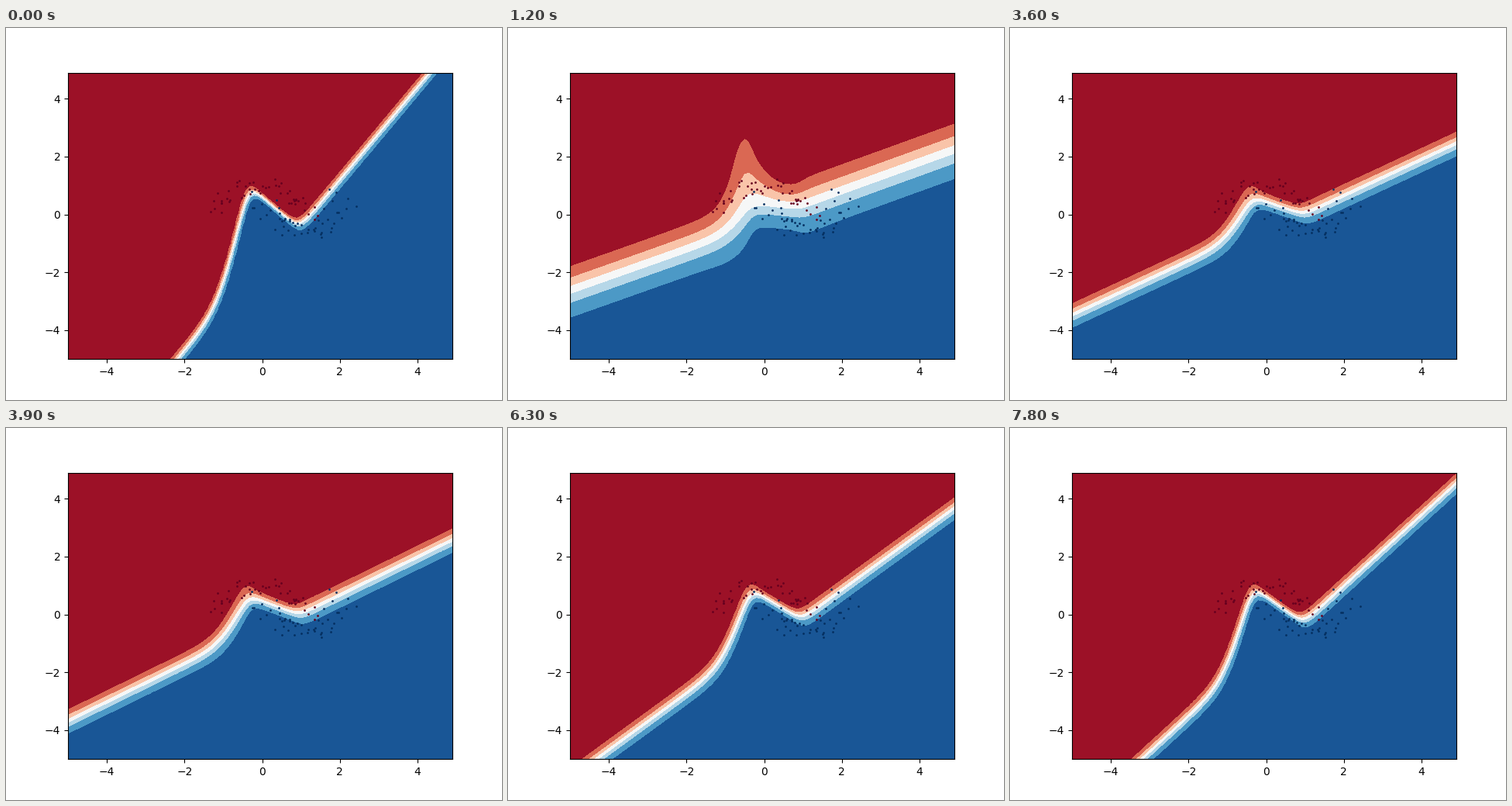
These frames come from a looping animation (640x480 px, 8 s). A matplotlib script:

```python
import numpy as np
import matplotlib.pyplot as plt
from matplotlib.animation import FuncAnimation

STEP_MS, TICK_MS, LOOP_MS = 300, 100, 8000
FIRST_EARLY, FIRST_SHARP = 2, 7       # steps where the net is young / has a clear boundary
START_SLOPE, TRAINED_SLOPE = .48, 1.6

AXIS = np.arange(-5, 5, 0.1)
X, Y = np.meshgrid(AXIS, AXIS)


def soft_max(a, b, heat):
    return heat * np.logaddexp(a / heat, b / heat)


def soft_min(a, b, heat):
    return -soft_max(-a, -b, heat)


def sigmoid(z):
    return 1 / (1 + np.exp(-z))


def boundary(slope, hump):
    """Two parallel lines joined over a rounded hump and a rounded dip."""
    left_at, hump_at, dip_at = -1.05, -.35, .95
    left_offset = .4 - 1.2 * slope
    left = slope * left_at + left_offset
    dip = slope * dip_at + .32 - 1.46 * slope
    rise = (hump - left) / (hump_at - left_at)
    fall = (dip - hump) / (dip_at - hump_at)
    corners = ((left_at, rise - slope, .22),
               (hump_at, fall - rise, .08),
               (dip_at, slope - fall, .1))
    curve = slope * AXIS + left_offset
    for at, bend, radius in corners:
        curve += bend * soft_max(AXIS - at, 0, radius)
    return curve


def sharp_logit(slope):
    """The boundary steepens as training goes on; its soft edge gets thinner."""
    gain = slope - START_SLOPE
    curve = boundary(slope, .35 + .65 * (1 - np.exp(-gain / .3)))
    width = .72 - .27 * gain + .3 * np.exp(-gain / 1.2) * np.gradient(curve, AXIS)
    width = np.maximum(width, .2)
    blur = 1 + 1.1 * np.exp(-gain / .1) * np.exp(-((AXIS + .4) / .5) ** 2)
    depth = curve - Y
    return np.clip(3.93 * depth / np.where(depth < 0, width * blur, width), -12, 12)


def early_logit():
    """Barely trained net: a red wedge on the left, a blue one on the right."""
    left_low = soft_min(-.28 + .309 * X - .698 * Y, .97, .3)
    left_high = soft_min(-.476 + .676 * X + .554 * Y, .22, .1)
    right_high = soft_max(.815 + .205 * X - .392 * Y, -.27, .1)
    right_low = soft_max(.927 + .386 * X + .246 * Y, .6, .1)
    side = sigmoid(2.7 + 4.6 * X - .39 * Y)
    field = ((1 - side) * soft_max(left_low, left_high, .64)
             + side * soft_min(right_high, right_low, .2))
    return np.clip(field, -2.1, 2.1)


def probability(step):
    if step == 0:                     # last pose of the previous training run
        return sigmoid(sharp_logit(TRAINED_SLOPE))
    if step < FIRST_SHARP:
        young = early_logit() * min(1, .3 + .35 * step)
        mix = max(0, step - FIRST_EARLY) / (FIRST_SHARP - FIRST_EARLY)
        return sigmoid((1 - mix) * young + mix * sharp_logit(START_SLOPE))
    age = step - FIRST_SHARP
    return sigmoid(sharp_logit(START_SLOPE + .025 * age + .00075 * age ** 2))


def two_moons(count, noise):
    rng = np.random.RandomState(0)
    angle = np.linspace(0, np.pi, count)
    upper = np.array([np.cos(angle), np.sin(angle)])
    lower = np.array([1 - np.cos(angle), .5 - np.sin(angle)])
    return [moon + rng.normal(scale=noise, size=moon.shape) for moon in (upper, lower)]


fig, ax = plt.subplots(figsize=(6.4, 4.8), dpi=100)
for moon, shade in zip(two_moons(50, .2), (0.0, 1.0)):
    ax.scatter(*moon, s=1, color=plt.cm.RdBu(shade), zorder=1.5)

shown = []


def draw(frame):
    while shown:
        shown.pop().remove()
    step = frame * TICK_MS // STEP_MS
    shown.append(ax.contourf(X, Y, probability(step), cmap="RdBu", zorder=1))
    ax.set(xlim=(-5, 4.9), ylim=(-5, 4.9))
    return shown


anim = FuncAnimation(fig, draw, frames=LOOP_MS // TICK_MS, interval=TICK_MS,
                     init_func=lambda: [], repeat=True, repeat_delay=0)
plt.show()
```
